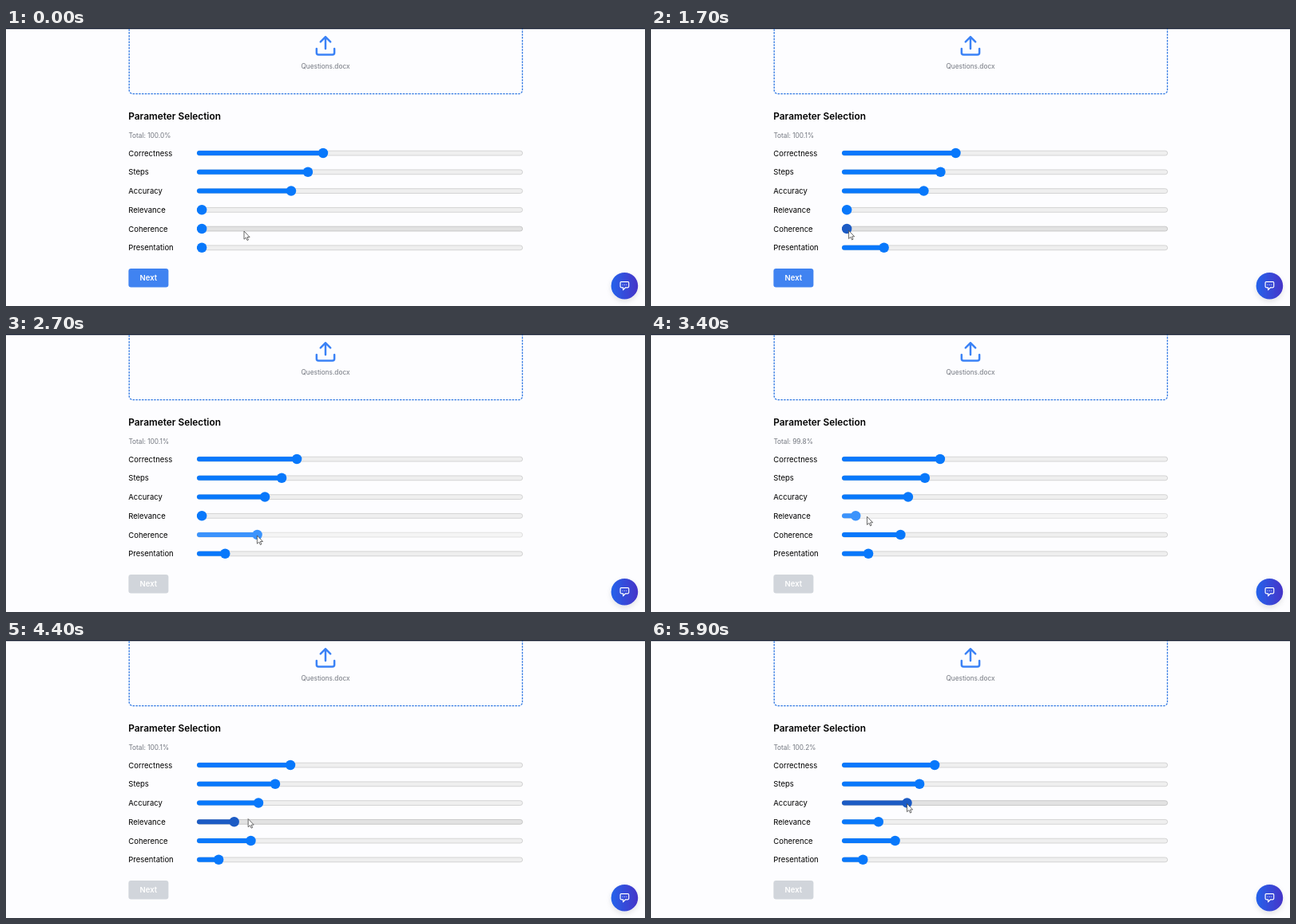
These frames come from a looping animation (800x349 px, 6 s). An HTML page:

```html
<!DOCTYPE html>
<html lang="en">
<head>
<meta charset="utf-8">
<title>Parameter Selection</title>
<style>
  html, body { margin: 0; width: 100%; height: 100%; overflow: hidden; background: #fdfdff; }
  svg { display: block; width: 800px; height: 349px; font: 9.5px Inter, sans-serif; }
  .small { font-size: 8.3px; fill: #71757e; }
  .icon { fill: none; stroke-width: 2; stroke-linecap: round; stroke-linejoin: round; }
  .thumb, .fill { fill: #0878fb; }
  .track { fill: #efefef; stroke: #c6c6c6; stroke-width: .7; }
  .track-over .track, .hover .track { fill: #e2e2e2; stroke: #b9b9b9; }
  .hover .thumb, .hover .fill { fill: #1c5bc4; }
  .active .track { fill: #f5f5f5; stroke: #d6d6d6; }
  .active .thumb, .active .fill { fill: #3b93fc; }
</style>
</head>
<body>
<svg viewBox="0 0 800 349">
  <defs>
    <linearGradient id="chat"><stop stop-color="#2563eb"/><stop offset="1" stop-color="#4634c8"/></linearGradient>
    <filter id="shadow" x="-50%" y="-50%" width="200%" height="200%">
      <feDropShadow dx="0" dy="3" stdDeviation="3" flood-opacity=".1"/>
    </filter>
  </defs>
  <rect width="800" height="1.3" fill="#0f172a"/>
  <path d="M154.2 1.3V78a4.7 4.7 0 0 0 4.7 4.7H641.8a4.7 4.7 0 0 0 4.7-4.7V1.3" fill="none" stroke="#3078e2" stroke-width="1.3" stroke-dasharray="2.5 1.3"/>
  <g class="icon" stroke="#3b82f6" transform="translate(385.1 7.4) scale(1.24)">
    <path d="M21 15v4a2 2 0 0 1-2 2H5a2 2 0 0 1-2-2v-4M17 8l-5-5-5 5M12 3v12"/>
  </g>
  <text class="small" x="400" y="51" text-anchor="middle">Questions.docx</text>
  <text x="153.2" y="114.7" font-size="11.86" font-weight="600">Parameter Selection</text>
  <text class="small" id="total" x="153.4" y="137.8"></text>
  <g id="rows"></g>
  <rect id="next" x="153.4" y="302" width="50" height="23.4" rx="3.2"/>
  <text x="178.3" y="317.1" text-anchor="middle" font-weight="600" fill="#fff">Next</text>
  <circle cx="774.4" cy="323.7" r="16.8" fill="url(#chat)" filter="url(#shadow)"/>
  <g class="icon" stroke="#fff" transform="translate(767.3 316.3) scale(.593)">
    <path d="M8 10h.01M12 10h.01M16 10h.01M9 16H5a2 2 0 0 1-2-2V6a2 2 0 0 1 2-2h14a2 2 0 0 1 2 2v8a2 2 0 0 1-2 2h-5l-5 5z"/>
  </g>
  <path id="cursor" d="M0 0V10.2L2.4 8.1 4 11.6 5.5 10.9 4 7.5H7.1Z" fill="#fff" stroke="#3c3c3c" stroke-width=".75" stroke-linejoin="round"/>
</svg>
<script>
const LOOP = 6000, STEP = 100, LEFT = 239, MIN = 245.2;
const labels = ['Correctness', 'Steps', 'Accuracy', 'Relevance', 'Coherence', 'Presentation'];
const initial = [397, 378, 357, MIN, MIN, MIN];

// Pointer drags from one x to another; error is the rounding left in the total
const drags = [
  { row: 5, start: 500, end: 1000, from: 245, to: 348.5, error: -.1 },
  { row: 5, start: 1000, end: 1400, from: 348.5, to: 291.5, error: .1 },
  { row: 4, start: 1900, end: 2700, from: 245, to: 314.4, error: .1 },
  { row: 3, start: 3100, end: 4200, from: 259.5, to: 300, error: .1 },
  { row: 2, start: 5200, end: 5700, from: 316, to: 320.5, error: .2 }
];

const $ = id => document.getElementById(id);
const rowY = i => 157 + i * 23.75;
const mix = (a, b, u) => a + (b - a) * u;
const progress = (t, start, end) => Math.min(1, Math.max(0, (t - start) / (end - start)));
const smooth = u => u * u * (3 - 2 * u);

$('rows').innerHTML = labels.map((label, i) => `
  <g transform="translate(0 ${rowY(i)})">
    <text x="153.3" y="3.6">${label}</text>
    <rect class="track" x="239.3" y="-2.8" width="407.4" height="5.8" rx="2.9"/>
    <rect class="fill" x="${LEFT}" y="-3" height="6.1" rx="3"/>
    <circle class="thumb" r="6.2"/>
  </g>`).join('');
const rows = [...$('rows').children].map(group => ({
  group, fill: group.querySelector('.fill'), thumb: group.querySelector('.thumb')
}));

// Between drags the pointer travels to the next grab and rests there briefly
function pointer(t) {
  let x = 298, y = 255, time = 0;
  for (const { row, start, end, from, to } of drags) {
    const grabY = rowY(row) + 1;
    if (t < start) {
      const u = smooth(progress(t, time, mix(time, start, .7)));
      return [mix(x, from, u), mix(y, grabY, u)];
    }
    x = mix(from, to, progress(t, start, end));
    y = grabY;
    time = end;
    if (t <= end) break;
  }
  return [x, y];
}

// Each drag takes its gain equally from the other rows in use
function positions(t) {
  const xs = [...initial];
  for (const { row, start, end, from, to } of drags) {
    const gain = (to - from) * progress(t, start, end);
    const others = xs.keys().filter(i => i !== row && xs[i] > MIN).toArray();
    xs[row] += gain;
    for (const i of others) xs[i] -= gain / others.length;
  }
  return xs;
}

function totalError(t) {
  const last = drags.findLast(drag => drag.start < t);
  if (!last) return 0;
  return t < last.end ? Math.round(2 * Math.sin(t / 50)) / 10 : last.error;
}

function draw(t) {
  const [px, py] = pointer(t);
  const pressed = drags.some(({ start, end }) => t >= start && t <= end);
  positions(t).forEach((x, i) => {
    const { group, fill, thumb } = rows[i];
    const state = pressed ? 'active' : Math.abs(px - x) < 20 ? 'hover' : 'track-over';
    group.setAttribute('class', Math.abs(py - rowY(i)) < 10 ? state : '');
    if (t > drags.at(-1).end && i === drags.at(-1).row) group.setAttribute('class', 'hover');
    fill.setAttribute('width', x - LEFT);
    thumb.setAttribute('cx', x);
  });
  $('total').textContent = `Total: ${(100 + totalError(t)).toFixed(1)}%`;
  $('next').setAttribute('fill', t > drags[2].start ? '#d1d5db' : '#4083f1');
  $('cursor').setAttribute('transform', `translate(${px} ${py})`);
}

function tick() {
  draw(Math.floor(performance.now() % LOOP / STEP) * STEP);
  requestAnimationFrame(tick);
}
tick();
</script>
</body>
</html>
```
